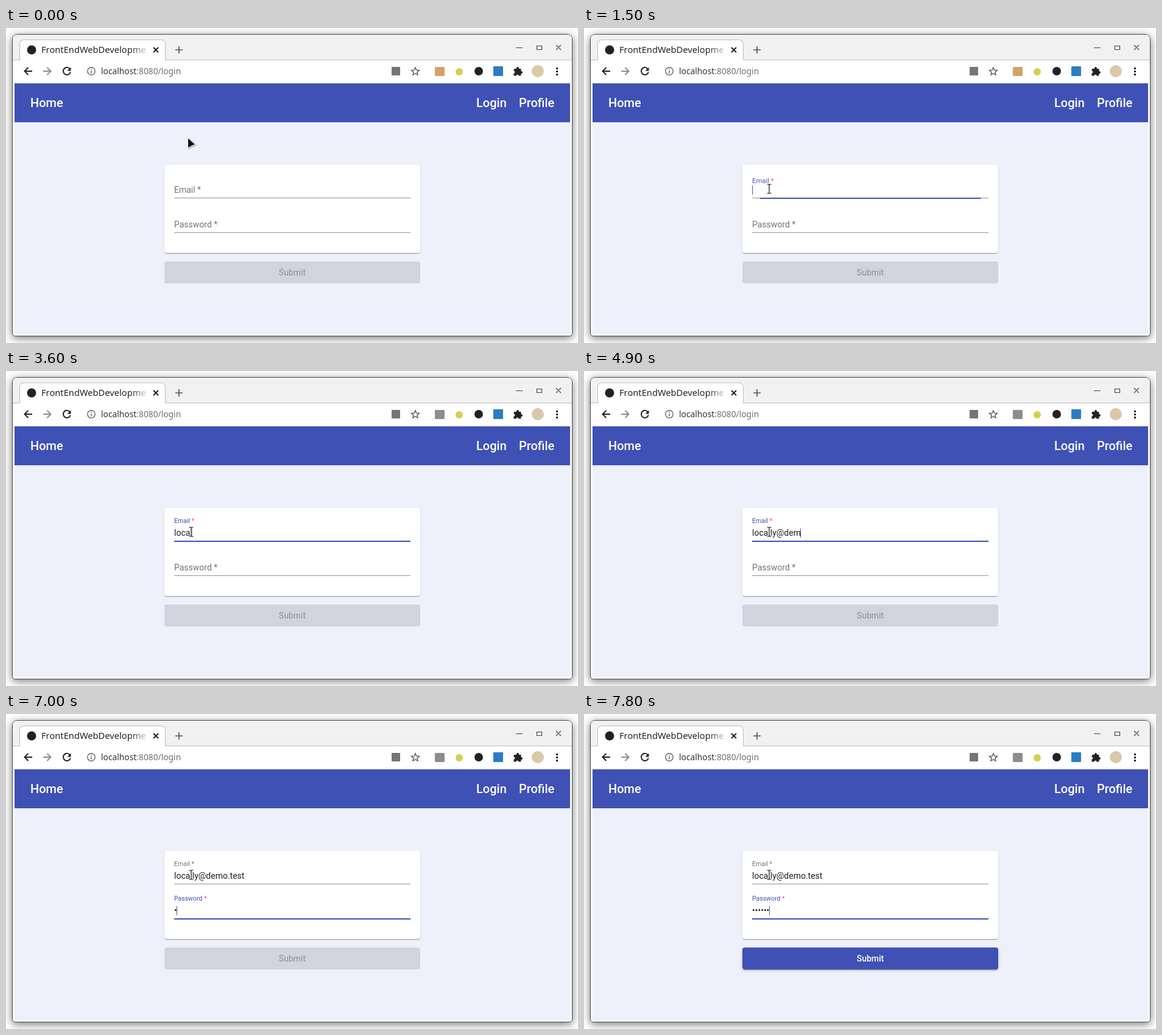
Write an HTML page that moves like this. It is 939 px wide and 518 px high and loops after 8 s.

```html
<!DOCTYPE html>
<html lang="en">
<head>
<meta charset="utf-8">
<title>Login form</title>
<style>
  html, body { margin: 0; width: 100%; height: 100%; overflow: hidden; background: #fff; }
  div, svg { position: absolute; box-sizing: border-box; }
  #window { left: 10px; top: 10px; width: 920px; height: 497px; border: 1px solid #4c4c4c; border-radius: 8px 8px 5px 5px;
    background: #fff; overflow: hidden; }
  #shade { left: 10px; top: 10px; width: 920px; height: 497px; border-radius: 8px 8px 5px 5px;
    box-shadow: 0 3px 14px rgba(0,0,0,.55); }
  #strip { left: 0; top: 0; width: 100%; height: 42px; background: #f1f1f1; border-bottom: 1px solid #bdbdbd; }
  #tab { left: 22px; top: 19px; width: 240px; height: 34px; background: #fff; border: 1px solid #bdbdbd;
    border-bottom: 0; border-radius: 7px 7px 0 0; }
  #page { left: 14px; top: 91px; width: 912px; height: 412px; background: #eef0fb; }
  #nav { left: 14px; top: 91px; width: 912px; height: 64px; background: #3f51b5; }
  #card { left: 260px; top: 225px; width: 420px; height: 145px; border-radius: 4px; background: #fff;
    box-shadow: 0 2px 1px -1px rgba(0,0,0,.2), 0 1px 1px rgba(0,0,0,.14), 0 1px 3px rgba(0,0,0,.12); }
  #button { left: 260px; top: 384px; width: 420px; height: 36px; border-radius: 4px; }
  svg { left: 0; top: 0; }
  text { font: 14px Roboto, sans-serif; white-space: pre; }
  .ui { font-family: "Noto Sans", "Open Sans", sans-serif; }
  .nav { font-size: 20px; font-weight: 500; fill: #fff; }
  .value { fill: #212121; }
  .line { fill: none; stroke: #222; stroke-width: 2; }
</style>
</head>
<body>
<div id="shade"></div>
<div id="window"><div id="strip"></div></div>
<div id="tab"></div>
<div id="page"></div>
<div id="nav"></div>
<div id="card"></div>
<div id="button"></div>
<svg width="939" height="518" viewBox="0 0 939 518">
  <defs>
    <linearGradient id="fade"><stop stop-color="#fff" stop-opacity="0"/><stop offset="1" stop-color="#fff"/></linearGradient>
  </defs>

  <!-- tab strip -->
  <circle cx="42" cy="36" r="7.5" fill="#222"/>
  <text class="ui" x="58" y="41" style="font-size:14.7px" fill="#222">FrontEndWebDevelopme</text>
  <rect x="204" y="24" width="32" height="24" fill="url(#fade)"/>
  <path class="line" d="M242 32l8 8m0-8l-8 8" stroke-width="1.8"/>
  <path class="line" d="M278 36h12m-6-6v12" style="stroke:#555;stroke-width:1.7"/>
  <path class="line" d="M837 32.5h11M871.5 29.5h8v6h-8zM903 28l8 8m0-8l-8 8" style="stroke:#444;stroke-width:1.2"/>

  <!-- toolbar -->
  <path class="line" d="M43 71H30.5m6-6l-6 6 6 6"/>
  <path class="line" d="M61 71h12.500m-6-6l6 6-6 6" style="stroke:#8c8c8c"/>
  <path class="line" d="M105 67.500a6 6 0 1 0 .8 5"/>
  <path d="M106.500 64.500v6h-6z" fill="#222"/>
  <circle class="line" cx="140" cy="71" r="6.200" style="stroke:#666;stroke-width:1.400"/>
  <path d="M139.300 70h1.500v4.500h-1.500zm0-2.800h1.500v1.500h-1.500z" fill="#666"/>
  <text class="ui" x="156" y="76" style="font-size:13.8px" fill="#333">localhost<tspan fill="#707070">:8080/login</tspan></text>
  <rect x="633" y="64" width="14" height="14" rx="1" fill="#757575"/>
  <path class="line" d="M672 65l1.800 4.200 4.600.4-3.500 3 1.100 4.500-4-2.400-4 2.400 1.100-4.500-3.500-3 4.600-.4z" style="stroke:#555;stroke-width:1.400"/>
  <rect id="extension" x="704" y="64" width="16" height="15" rx="1.500"/>
  <circle cx="744" cy="72" r="6" fill="#d6cf4e"/>
  <circle cx="776" cy="71" r="7" fill="#222"/>
  <rect x="800" y="63" width="16" height="16" rx="1" fill="#2c7cc4"/>
  <path d="M834 67h4v-1a2 2 0 0 1 4 0v1h3.500v4h.500a2 2 0 0 1 0 4h-.500v3.500h-4a2 2 0 0 0-4 0h-4v-4a2 2 0 0 0 0-4z" fill="#222"/>
  <circle cx="873" cy="71" r="10" fill="#d9c9a8"/>
  <path d="M903 65h3v3h-3zm0 5h3v3h-3zm0 5h3v3h-3z" fill="#222"/>

  <!-- page -->
  <text class="nav" x="40" y="130">Home</text>
  <text class="nav" x="772" y="130">Login</text>
  <text class="nav" x="842" y="130">Profile</text>
  <path d="M276 279h388v1H276zm0 57h388v1H276z" fill="#949494"/>
  <rect id="emailBar" y="279" height="2" fill="#3f51b5"/>
  <rect id="passBar" y="336" height="2" fill="#3f51b5"/>
  <text id="emailLabel">Email <tspan>*</tspan></text>
  <text id="passLabel">Password <tspan>*</tspan></text>
  <text id="email" class="value" x="276" y="271"></text>
  <text id="pass" class="value" x="276" y="328"></text>
  <rect id="caret" width="1" height="15" fill="#3f51b5"/>
  <text id="submit" x="470" y="407" text-anchor="middle" style="font-weight:500">Submit</text>

  <!-- pointers -->
  <g id="arrow" style="filter:drop-shadow(1px 1px 1px rgba(0,0,0,.4))">
    <path d="M.5 .5V17.500L5.500 14.500 12.500 11.500z" fill="#111" stroke="#fff" stroke-linejoin="round"/>
  </g>
  <g id="beam" fill="none">
    <path d="M-3.500-7.500H-1L0-6.500 1-7.500H3.500M-3.500 7.500H-1L0 6.500 1 7.500H3.500M0-6.500V6.500" stroke="#fff" stroke-width="3"/>
    <path d="M-3.500-7.500H-1L0-6.500 1-7.500H3.500M-3.500 7.500H-1L0 6.500 1 7.500H3.500M0-6.500V6.500" stroke="#111" stroke-width="1.200"/>
  </g>
</svg>
<script>
const $ = id => document.getElementById(id);
const set = (id, attrs) => { for (const k in attrs) $(id).setAttribute(k, attrs[k]); };

const ADDRESS = 'locally@demo.test';
const EMAIL_FOCUS = 1385, PASS_FOCUS = 5990, ENABLED = 7018;
// [time, characters in the field]
const emailKeys = [[1500, 0], [2200, 1], [2400, 2], [3200, 3], [3400, 4], [3600, 5], [3800, 6], [3900, 7], [4300, 8],
  [4700, 9], [4800, 10], [4900, 11], [5100, 12], [5400, 13], [5900, 17]];
const passKeys = [[6100, 0], [7000, 1], [7200, 2], [7300, 3], [7400, 4], [7800, 6]];
const lastKey = (keys, t) => keys.filter(k => k[0] <= t).pop() || [0, 0];

const clamp = x => Math.max(0, Math.min(1, x));
const mix = (a, b, p) => a + (b - a) * p;
const rgb = (a, b, p) => `rgb(${a.map((v, i) => mix(v, b[i], p)).join()})`;
const GREY = [117, 117, 117], INDIGO = [63, 81, 181];

// cubic-bezier(.25, .8, .25, 1)
function ease(x) {
  x = clamp(x);
  let lo = 0, hi = 1, s;
  for (let i = 0; i < 24; i++) {
    s = (lo + hi) / 2;
    if (.75 * s * (1 - s) + s ** 3 < x) lo = s; else hi = s;
  }
  return 2.4 * (1 - s) ** 2 * s + 3 * (1 - s) * s * s + s ** 3;
}

function drawField(name, base, t, focus, blur) {
  const active = t >= focus && t < blur;
  const float = ease((t - focus) / 400);
  const label = $(name + 'Label');
  label.setAttribute('transform', `translate(276 ${base - 21 * float}) scale(${1 - float / 4})`);
  label.style.fill = rgb(GREY, INDIGO, float - ease((t - blur) / 400));
  label.lastChild.style.fill = active ? '#ff4081' : 'inherit';
  const width = active ? 388 * mix(.5, 1, ease((t - focus) / 300)) : 0;
  set(name + 'Bar', { x: 470 - width / 2, width });
}

function draw(t) {
  drawField('email', 271, t, EMAIL_FOCUS, PASS_FOCUS);
  drawField('pass', 328, t, PASS_FOCUS, Infinity);

  const inPass = t >= PASS_FOCUS;
  $('email').textContent = ADDRESS.slice(0, lastKey(emailKeys, t)[1]);
  $('pass').textContent = '•'.repeat(lastKey(passKeys, t)[1]);
  const key = lastKey(inPass ? passKeys : emailKeys, t);
  const length = key[1] ? $(inPass ? 'pass' : 'email').getComputedTextLength() : 0;
  set('caret', {
    x: 276 + Math.floor(length), y: inPass ? 316 : 259,
    opacity: key[0] && (t - key[0]) % 1000 < 500 ? 1 : 0
  });

  const lit = ease((t - ENABLED) / 400), lift = ease((t - ENABLED) / 280);
  $('button').style.background = rgb([209, 211, 221], INDIGO, lit);
  $('button').style.boxShadow = `0 ${3 * lift}px 1px -2px rgba(0,0,0,${.2 * lift}),
    0 ${2 * lift}px 2px rgba(0,0,0,${.14 * lift}), 0 1px ${5 * lift}px rgba(0,0,0,${.12 * lift})`;
  $('submit').style.fill = t > ENABLED ? '#fff' : '#9b9ca4';
  set('extension', { fill: t < 2200 ? '#d5a06c' : '#8d8d8d' });

  const move = clamp((t - 500) / 300), overField = t >= 1000;
  set('arrow', { transform: `translate(${mix(298, 305, move)} ${mix(180, 252, move)})`, opacity: overField ? 0 : 1 });
  set('beam', { transform: `translate(304 ${t < 1100 ? 266 : 264.500})`, opacity: overField ? 1 : 0 });
}

function frame(now) {
  draw(Math.floor(now % 8000 / 100) * 100);
  requestAnimationFrame(frame);
}
draw(0);
requestAnimationFrame(frame);
</script>
</body>
</html>
```
